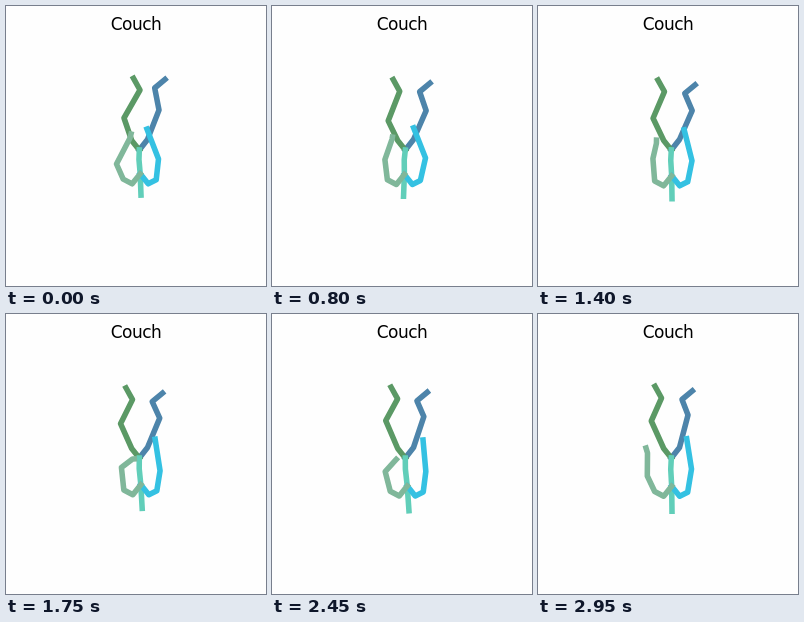
These frames come from a looping animation (260x280 px, 3 s). An HTML page:

```html
<!DOCTYPE html>
<html lang="en">
<head>
<meta charset="utf-8">
<title>Couch</title>
<style>
  html, body { margin: 0; width: 100%; height: 100%; overflow: hidden; background: #fefefe; }
  svg { display: block; width: 260px; height: 280px; }
  text { font: 17px "DejaVu Sans", sans-serif; letter-spacing: -0.5px; text-anchor: middle; }
  polyline { fill: none; stroke-width: 5.56; stroke-linecap: square; stroke-linejoin: round; }
</style>
</head>
<body>
<svg viewBox="0 0 260 280"><text x="130" y="24">Couch</text></svg>
<script>
const LOOP = 3000, STEP = 50;

const add = (p, x, y) => [p[0] + x, p[1] + y];
const mix = (a, b, k) => a.map((v, i) => v + (b[i] - v) * k);

// Straight drift from a to b, with a bulge midway and a sway to and fro
const drift = (u, a, b, bulge, sway = [0, 0]) => mix(a, b, u).map((v, i) =>
  v + bulge[i] * Math.sin(Math.PI * u) + sway[i] * Math.sin(2 * Math.PI * u));

// Single smooth rise and fall around a moment
function pulse(t, peak, reach) {
  const d = Math.min(Math.abs(t - peak) / reach, 1);
  return Math.cos(d * Math.PI / 2) ** 2;
}

function leftLeg(u, root) {
  const knee = drift(u, [153, 104], [150, 101], [2.6, 2]);
  const ankle = drift(u, [148.7, 82], [144, 85.5], [0.3, 3.7]);
  return [root, [141.5, 133.5], knee, ankle, add(ankle, 10.3, -8.5)];
}

function rightLeg(u, root) {
  const knee = drift(u, [118, 112], [113.3, 107], [-0.7, 2.2], [0, 2.6]);
  const ankle = drift(u, [134, 84], [123.5, 84], [-2.3, 1.7], [0, 0].fill(-1.7, 0, 1));
  return [root, [125.7, 134.5], knee, ankle, add(ankle, -6.5, -11.7)];
}

function leftArm(u, chest) {
  const elbow = drift(u, [152.5, 153], [153.5, 155], [1, 1.2], [0, -2.5]);
  const hand = drift(u, [141, 123], [148.7, 124.7], [2, 0.3], [-3, -1.8]);
  return [chest, add(chest, 8, 10), add(chest, 16, 6), elbow, mix(elbow, hand, 0.67), hand];
}

// The right forearm folds in toward the chest and opens again
function rightArm(u, chest, t) {
  const tuck = pulse(t, 2100, 850);
  const elbow = drift(u, [110.5, 158], [109.3, 162], [5.2, -7.2], [-1.2, 0]);
  const wrist = drift(u, [124, 132], [109.5, 139], [0, 1.5], [0, -2]);
  const hand = drift(u, [125, 128], [108, 134], [0, 2]);
  return [chest, add(chest, -8, 10), add(chest, -17, 5.3), elbow,
    add(wrist, 17.5 * tuck, 10 * tuck), add(hand, 21 * tuck, 18 * tuck)];
}

function pose(t) {
  const u = t / (LOOP - STEP), root = [133.3, 144];
  const head = drift(u, [135, 189], [134, 197.2], [0, 0], [-3.2, -1]);
  const chest = mix(root, head, 0.53);
  const spine = [root, add(mix(root, chest, 0.4), -0.7, 0), chest, head];
  return [leftLeg(u, root), rightLeg(u, root), spine, leftArm(u, chest), rightArm(u, chest, t)];
}

const svg = document.querySelector('svg');
const lines = ['#4D84AA', '#5B9965', '#61CEB9', '#34C1E2', '#80B79A'].map(color => {
  const line = document.createElementNS('http://www.w3.org/2000/svg', 'polyline');
  line.setAttribute('stroke', color);
  return svg.appendChild(line);
});

function draw(now) {
  const t = Math.floor(now % LOOP / STEP) * STEP;
  pose(t).forEach((points, i) => lines[i].setAttribute('points', points.join(' ')));
}

const start = performance.now();
function tick() {
  draw(performance.now() - start);
  requestAnimationFrame(tick);
}
tick();
</script>
</body>
</html>
```
